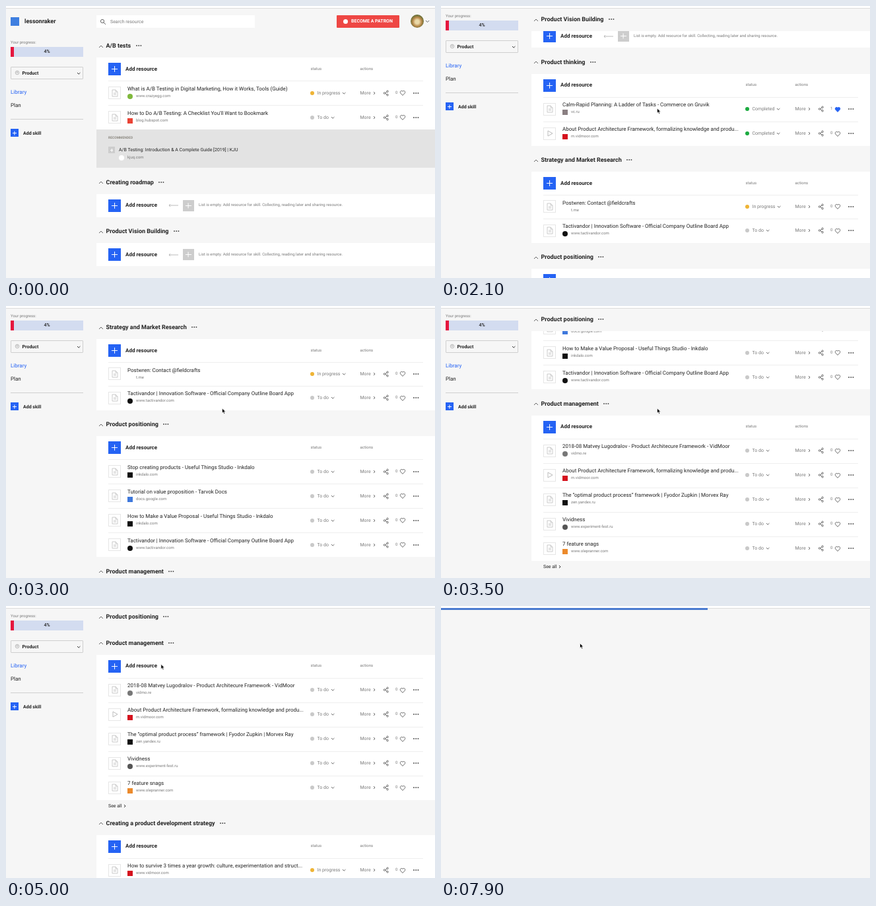
These frames come from a looping animation (650x412 px, 8000 ms). An HTML page:

```html
<!DOCTYPE html>
<html lang="en">
<head>
<meta charset="utf-8">
<title>Resource library</title>
<style>
html, body { margin: 0; width: 100%; height: 100%; overflow: hidden; background: #f6f6f6; }
body { font: 7px/12px Roboto, sans-serif; color: #222; text-rendering: geometricPrecision; }
#stage { position: absolute; left: 0; top: 0; width: 650px; height: 412px; overflow: hidden; background: #f6f6f6; }
#view { position: absolute; inset: 0; overflow: hidden; }
#page { position: relative; display: flex; }
#page *, #stage > * { box-sizing: border-box; }
svg { position: absolute; overflow: visible; fill: none; stroke: #666; stroke-width: 1; }
.at { position: absolute; white-space: nowrap; }
.grey { color: #7b7b7b; }
.tiny { font-size: 6px; }
.bold { font-weight: 700; }
.plus { position: absolute; background: #2563f4; }
.plus::before, .plus::after { content: ""; position: absolute; inset: calc(50% - .5px) 26%; background: #fff; }
.plus::after { transform: rotate(90deg); }
.plus.pale { background: #cdcdcd; }

aside { position: sticky; top: -40px; width: 137px; height: 260px; flex: none; align-self: flex-start; }
.meter { left: 7px; top: 62px; width: 110px; height: 15px; line-height: 15px; text-align: center; font-weight: 500;
  background: linear-gradient(90deg, #e5173f 5px, #d3dcf0 5px); }
.picker { left: 7px; top: 92px; width: 110px; height: 19px; border: 1px solid #cfcfcf; border-radius: 1px; }
.rule { left: 7px; top: 171px; width: 110px; height: 1px; background: #cfcfcf; }
.nav { left: 7px; font-size: 8px; }
.search { left: 137px; top: 14px; width: 240px; height: 19px; background: #fff; }
.patron { left: 501px; top: 14px; width: 95px; height: 19px; border-radius: 1px; background: #ee4744; color: #fff; line-height: 19px; padding-left: 22px; }
.patron::before { content: ""; position: absolute; left: 10px; top: 6px; width: 7px; height: 7px; border-radius: 50%; background: #fff; }
.avatar { left: 613px; top: 13px; width: 20px; height: 20px; border-radius: 50%;
  background: radial-gradient(circle at 50% 55%, #ead9a8 20%, #b98a4c 45%, #5f6b32 72%, #3d4a28); }

main { width: 513px; padding-top: 44px; }
section { position: relative; margin-bottom: 5.5px; }
h2 { position: sticky; top: 4px; z-index: 2; height: 34px; margin: 0; padding-left: 14.5px; background: #f6f6f6;
  font: 700 9px/34px Roboto, sans-serif; white-space: nowrap; }
h2 .dots { display: inline-block; position: relative; width: 9px; height: 2px; margin-left: 7.5px; vertical-align: 2px; }
.card { background: #fff; }
.add, .row { position: relative; height: 35px; }
.row { height: 37px; }
.row.short { height: 35.5px; }
.row::before { content: ""; position: absolute; left: 18px; right: 18px; top: 0; border-top: 1px solid #eee; }
.mid { position: absolute; left: 0; top: 50%; }
.kind { left: 18px; top: -9.5px; width: 19px; height: 19px; border: 1px solid #e6e6e6; }
.title { left: 47px; top: 6.5px; font-size: 8px; }
.site { left: 60px; top: 17.5px; }
.mark { position: absolute; left: 47px; top: 19.5px; width: 8px; height: 8px; }
.round { border-radius: 50%; }
.state { left: 334.5px; top: -6px; }
.state i { position: absolute; left: -10.5px; top: 3px; width: 6px; height: 6px; border-radius: 50%; }
.state svg { left: calc(100% + 4px) !important; top: 5px !important; }
.tips { position: relative; height: 58px; background: #e3e3e3; }
.all { height: 13.5px; position: relative; }

#strip { position: absolute; left: 0; top: 0; width: 650px; height: 4px; background: #fff; border-bottom: 1px solid #dcdcdc; z-index: 3; }
#bar { position: absolute; left: 0; top: 3px; height: 2.5px; background: #4a7bd0; z-index: 4; }
#cursor { left: 0; top: 0; z-index: 5; fill: #000; stroke: #fff; stroke-width: .7; }
</style>
</head>
<body>
<div id="stage">
  <div id="view"><div id="page"></div></div>
  <div id="strip"></div>
  <div id="bar"></div>
  <svg id="cursor" width="7" height="10"><path d="M0 0V7.2L1.7 5.7L2.9 8.4L4.2 7.8L3 5.2H5.3Z"/></svg>
</div>
<script>
const $ = id => document.getElementById(id);

const svg = (x, y, body, style = '') => `<svg width="1" height="1" style="left:${x}px;top:${y}px;${style}">${body}</svg>`;
const path = (x, y, d, style) => svg(x, y, `<path d="${d}"/>`, style);
const text = (x, y, words, cls = '') => `<div class="at ${cls}" style="left:${x}px;top:${y - 6}px">${words}</div>`;
const plus = (x, y, size, cls = '') =>
  `<div class="plus ${cls}" style="left:${x}px;top:${y}px;width:${size}px;height:${size}px"></div>`;

const DOWN = 'M0 0L2.2 2.2L4.4 0', UP = 'M0 3L3 0L6 3', NEXT = 'M0 0L2 2L0 4';
const DOC = 'M0 0H5L8 3V10H0ZM5 0V3H8M2 5H6M2 7H6', PLAY = 'M0 0L7 4L0 8Z';
const HEART = 'M4 7.4L.8 4.1C-.8 2 1.7-1 4 1.3C6.3-1 8.8 2 7.2 4.1Z';
const SHARE = '<path d="M2 4L6 1.5M2 4L6 6.5"/><g fill="#fff"><circle cx="1.5" cy="4" r="1.3"/>' +
  '<circle cx="6" cy="1.3" r="1.3"/><circle cx="6" cy="6.7" r="1.3"/></g>';
const dots = (x, y) => svg(x, y, '<path d="M1 1h.01M4.2 1h.01M7.4 1h.01"/>', 'stroke:#555;stroke-width:2;stroke-linecap:round');

const STATES = { todo: ['To do', '#c9c9c9'], doing: ['In progress', '#efb435'], done: ['Completed', '#1cab40'] };

function mark(look) {
  if (!look) return '';
  const [shape, colour] = look.split(' ');
  return `<div class="mark ${shape}" style="background:${colour}"></div>`;
}

function row([title, site, look, state = 'todo', video, likes = 0]) {
  const [label, colour] = STATES[state];
  return `<div class="row ${look ? '' : 'short'}">
    <div class="at title">${title}</div>${mark(look)}<div class="at site tiny grey">${site}</div>
    <div class="mid"><div class="at kind"></div>
      ${video ? path(24.5, -4, PLAY, 'stroke:#bbb') : path(23.5, -5, DOC, 'stroke:#c4c4c4;stroke-width:.9')}
      <div class="at state grey"><i style="background:${colour}"></i>${label}${path(0, 0, DOWN)}</div>
      ${text(399.5, 0, 'More', 'grey')}${path(419.5, -2, NEXT)}
      ${svg(435, -4, SHARE, 'stroke-width:.9')}${text(453, 0, likes, 'tiny grey')}
      ${path(460, -3.5, HEART, likes ? 'fill:#2563f4;stroke:#2563f4' : '')}${dots(480, -1)}
    </div></div>`;
}

function section({ name, rows = [], extra = '', more = '' }) {
  const side = rows.length
    ? text(324.5, 17.5, 'status', 'tiny grey') + text(399.5, 17.5, 'actions', 'tiny grey')
    : path(109.5, 17.5, 'M0 0H14M2 -2L0 0L2 2', 'stroke:#aaa;stroke-width:.8') + plus(131, 9, 17, 'pale') +
      text(155, 17.5, 'List is empty. Add resource for skill. Collecting, reading later and sharing resource.', 'tiny grey');
  return `<section><h2>${path(3.5, 15.5, UP)}${name}<span class="dots">${dots(0, 0)}</span></h2>
    <div class="card"><div class="add">${plus(18, 8, 19)}
      <div class="at bold" style="left:44px;top:11.5px;font-size:8px">Add resource</div>${side}</div>
      ${rows.map(row).join('')}${extra}</div>${more}</section>`;
}

const tips = `<div class="tips">
  <div class="at bold" style="left:18px;top:6.5px;font-size:5px;color:#8b8880">RECOMMENDED</div>
  ${plus(18, 26, 10, 'pale')}${text(34, 31, 'A/B Testing: Introduction &amp; A Complete Guide [2019] | KJU')}
  <div class="mark round" style="left:34px;top:39px;background:#fff"></div>${text(47, 43, 'kjuq.com', 'tiny grey')}</div>`;
const seeAll = `<div class="all">${text(18, 9, 'See all')}${path(42, 7, NEXT, 'stroke:#333')}</div>`;

const canvasApp = ['Tactivandor | Innovation Software - Official Company Outline Board App', 'www.tactivandor.com', 'round #111'];
const framework = state => ['About Product Architecture Framework, formalizing knowledge and produ...', 'm.vidmoor.com', 'square #d5121e', state, true];

const sections = [
  { name: 'A/B tests', extra: tips, rows: [
    ['What is A/B Testing in Digital Marketing, How it Works, Tools (Guide)', 'www.crazyegg.com', 'round #7fb83c', 'doing'],
    ['How to Do A/B Testing: A Checklist You\'ll Want to Bookmark', 'blog.hubspot.com', 'square #ea4335'] ] },
  { name: 'Creating roadmap' },
  { name: 'Product Vision Building' },
  { name: 'Product thinking', rows: [
    ['Calm-Rapid Planning: A Ladder of Tasks - Commerce on Gruvik', 'vc.ru', 'square #8a7f82', 'done', false, 1],
    framework('done') ] },
  { name: 'Strategy and Market Research', rows: [
    ['Postwren: Contact @fieldcrafts', 't.me', '', 'doing'], canvasApp ] },
  { name: 'Product positioning', rows: [
    ['Stop creating products - Useful Things Studio - Inkdalo', 'inkdalo.com', 'square #111'],
    ['Tutorial on value proposition - Tarvok Docs', 'docs.google.com', 'square #3f78dc'],
    ['How to Make a Value Proposal - Useful Things Studio - Inkdalo', 'inkdalo.com', 'square #111'],
    canvasApp ] },
  { name: 'Product management', more: seeAll, rows: [
    ['2018-08 Matvey Lugodralov - Product Architecure Framework - VidMoor', 'vidmo.re', 'round #777'],
    framework(),
    ['The “optimal product process” framework | Fyodor Zupkin | Morvex Ray', 'zen.yandex.ru', 'square #111'],
    ['Vividness', 'www.experiment-fest.ru', 'round #555'],
    ['7 feature snags', 'www.olepranner.com', 'square #ec8a2c'] ] },
  { name: 'Creating a product development strategy', rows: [
    ['How to survive 3 times a year growth: culture, experimentation and struct...', 'www.vidmoor.com', 'square #d5121e', 'doing'],
    framework() ] }
];

$('page').innerHTML = `
  <div class="at" style="left:7px;top:17px;width:13px;height:13px;background:#3f7fe0"></div>
  <div class="at bold" style="left:28px;top:17.5px;font-size:9px">lessonraker</div>
  <div class="at search"></div>
  ${svg(142.5, 20, '<circle cx="3" cy="3" r="2.6"/><path d="M5 5L8 8"/>')}${text(158, 23.5, 'Search resource', 'grey')}
  <div class="at patron bold">BECOME A PATRON</div>
  <div class="at avatar"></div>${path(636, 22, 'M0 0L2.6 2.6L5.2 0')}
  <aside>
    ${text(7, 55.5, 'Your progress:', 'tiny grey')}
    <div class="at meter">4%</div>
    <div class="at picker"></div>
    ${svg(14, 98, '<circle cx="3" cy="3" r="2.8"/><circle cx="3" cy="2.6" r=".9"/>', 'stroke:#aaa;stroke-width:.8')}
    ${text(24.5, 101.5, 'Product', 'bold')}${path(107.5, 100.5, DOWN, 'stroke:#333')}
    <div class="at nav" style="top:125px;color:#2563f4">Library</div>
    <div class="at nav" style="top:145px">Plan</div>
    <div class="at rule"></div>
    ${plus(7, 186, 12)}${text(26, 192.5, 'Add skill', 'bold')}
  </aside>
  <main>${sections.map(section).join('')}</main>`;

// Each move is [start, end, target, power]; the value eases out to every target in turn.
function glide(value, moves, time) {
  for (const [start, end, target, power = 3] of moves) {
    if (time <= start) break;
    const left = Math.max(0, 1 - (time - start) / (end - start));
    value = target + (value - target) * left ** power;
  }
  return value;
}

const LOOP = 8000, STEP = 100, BLANK_AT = 6400;
const scrollMoves = [[1458, 2100, 331, 2], [2230, 3100, 532], [3130, 4000, 846], [4200, 5100, 878]];
const cursorX = [[90, 400, 327.5, 1.5], [4250, 5050, 234.5, 2], [5150, 5600, 199, 2], [5600, 6000, 210.5, 2]];
const cursorY = [[90, 400, 155, 1.5], [4250, 5050, 88, 2], [5150, 5600, 47, 2], [5600, 6000, 56.5, 2]];

function draw(now) {
  const time = Math.floor((now % LOOP) / STEP) * STEP;
  $('view').style.visibility = time < BLANK_AT ? 'visible' : 'hidden';
  $('view').scrollTop = Math.round(glide(0, scrollMoves, time));
  $('cursor').style.transform = `translate(${glide(-8, cursorX, time)}px, ${glide(304, cursorY, time)}px)`;
  $('bar').style.width = Math.max(0, 404 * (time - 6200) / 1700) + 'px';
}

let origin;
function tick(now) {
  origin ??= now;
  draw(now - origin);
  requestAnimationFrame(tick);
}
draw(0);
requestAnimationFrame(tick);
</script>
</body>
</html>
```
